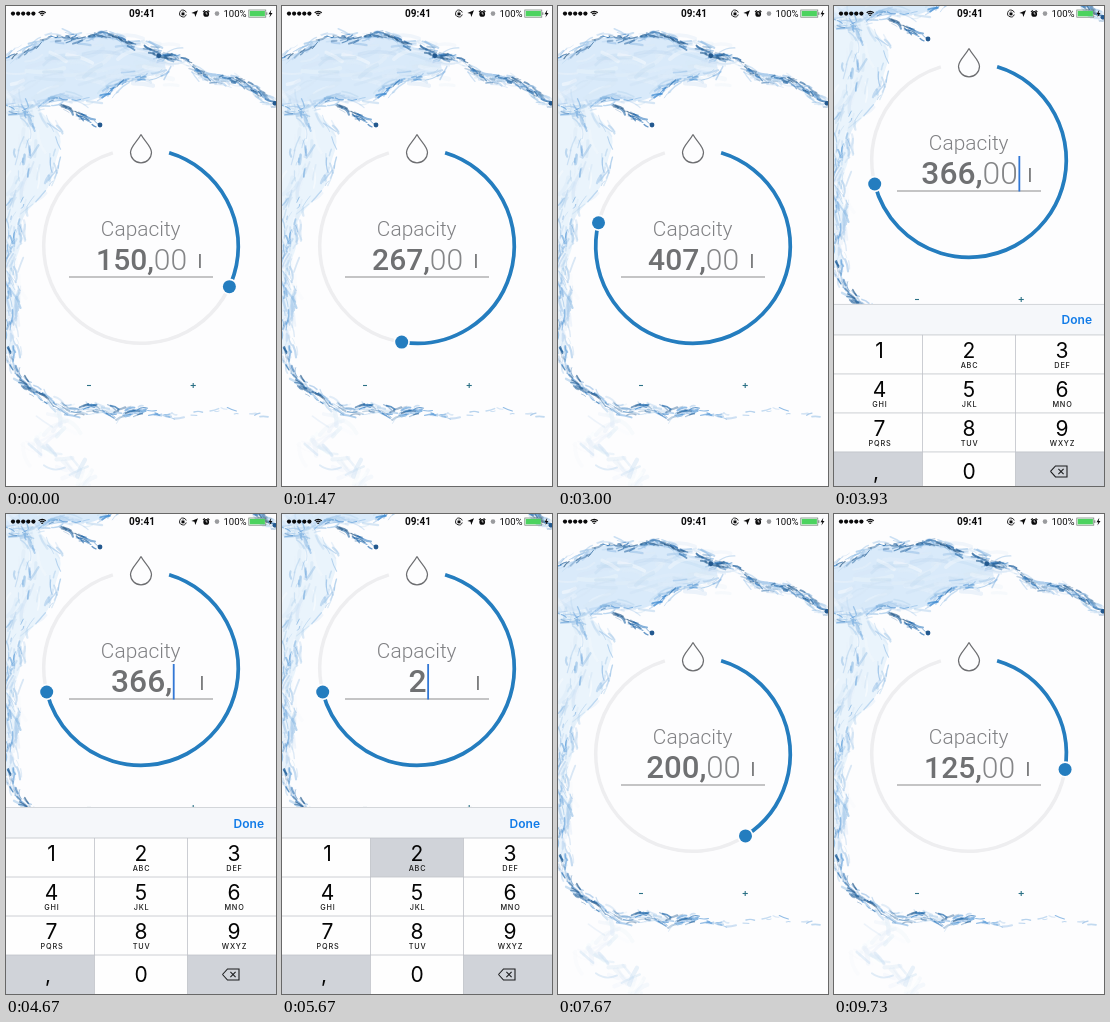
An HTML page with a canvas that plays this animation: 270 px wide and 480 px high, repeating every 9.99 s.

```html
<!DOCTYPE html>
<html lang="en">
<head>
<meta charset="utf-8">
<title>Capacity dial</title>
<style>
html, body { margin: 0; width: 100%; height: 100%; overflow: hidden; background: #fdfdfe; }
canvas { display: block; width: 270px; height: 480px; }
</style>
</head>
<body>
<canvas id="stage"></canvas>
<script>
const W = 270, H = 480, LOOP = 9990, SHIFT = 86, TAU = Math.PI * 2;
const PAPER = '#fdfdfe', BLUE = '#247dbf', BLACK = '#0b0b0c';
const ROBOTO = 'Roboto, sans-serif', INTER = 'Inter, sans-serif';
const SHOW = 3630, DONE = 6450;
const dpr = window.devicePixelRatio || 1;

function prepare(canvas) {
  canvas.width = W * dpr;
  canvas.height = H * dpr;
  const c = canvas.getContext('2d');
  c.scale(dpr, dpr);
  return c;
}
const ctx = prepare(document.getElementById('stage'));

const clamp = x => Math.max(0, Math.min(1, x));
const mix = (a, b, u) => a + (b - a) * u;
const ease = x => { x = clamp(x); return x * x * (3 - 2 * x); };
const spring = ms => { const w = Math.max(0, ms) * 0.0183; return 1 - (1 + w) * Math.exp(-w); };

// ---------- water backdrop ----------
let seed = 71;
const rand = () => (seed = (seed * 16807) % 2147483647) / 2147483647;
const spread = n => (rand() + rand() - 1) * n;

// Each curve maps u in 0..1 to a point
const along = (from, to, y) => u => { const x = mix(from, to, u); return [x, y(x)]; };
const crestTop = along(-5, 160, x => 30 + 22 * ((x - 80) / 80) ** 2 + 2.5 * Math.sin(x / 9));
const crestBottom = along(-5, 160, x => 102 - 42 * (x / 160) ** 2 + 4 * Math.sin(x / 11));
const crestBody = u => [crestTop(u)[0], mix(crestTop(u)[1], crestBottom(u)[1], 0.5)];
const arm = along(148, 269, x => 47 + (x - 150) * 0.39 + 4 * Math.sin(x / 10));
const spur = along(56, 94, x => 100 + (x - 56) * 0.5);
const columnEdge = u => {
  const y = mix(95, 350, u);
  return [8 + 46 * Math.exp(-(((y - 145) / 58) ** 2)) + 3 * Math.sin(y / 9), y];
};
const columnCore = u => { const [x, y] = columnEdge(u); return [x * 0.4, y]; };
const wave = along(-3, 135, x => 406 - 64 * Math.exp(-Math.max(0, x) / 24) + 2 * Math.sin(x / 8));
const ripple = along(120, 258, x => 407 + 2 * Math.sin(x / 12));
const fall = u => [mix(36, 62, u) + 18 * Math.sin(u * 9), mix(408, 472, u)];

function fillBetween(c, first, second, color) {
  c.fillStyle = color;
  c.beginPath();
  for (let u = 0; u <= 1; u += 0.02) c.lineTo(...first(u));
  for (let u = 1; u >= 0; u -= 0.02) c.lineTo(...second(u));
  c.fill();
}

// Short curved strokes scattered along a curve
function wisps(c, curve, { count, jitter, length, width, hue = 209, light, alpha }) {
  for (let k = 0; k < count; k++) {
    const u = rand(), [x0, y0] = curve(u), [x1, y1] = curve(u + 0.02);
    const x = x0 + spread(jitter), y = y0 + spread(jitter);
    const dir = Math.atan2(y1 - y0, x1 - x0) + spread(0.6), len = length * mix(0.15, 0.5, rand());
    const dx = Math.cos(dir) * len, dy = Math.sin(dir) * len, bend = spread(0.7);
    c.strokeStyle = `hsla(${hue}, 62%, ${light + spread(14)}%, ${alpha * mix(0.3, 1, rand())})`;
    c.lineWidth = width * mix(0.3, 1, rand());
    c.beginPath();
    c.moveTo(x - dx, y - dy);
    c.quadraticCurveTo(x - dy * bend, y + dx * bend, x + dx, y + dy);
    c.stroke();
  }
}

function paintWater() {
  const canvas = document.createElement('canvas'), c = prepare(canvas);
  c.fillStyle = PAPER;
  c.fillRect(0, 0, W, H);
  c.lineCap = 'round';
  c.filter = `blur(${0.6 * dpr}px)`;
  fillBetween(c, crestTop, crestBottom, '#d9eafa');
  fillBetween(c, columnEdge, u => [-5, columnEdge(u)[1]], '#eaf4fc');
  wisps(c, crestBody, { count: 70, jitter: 26, length: 38, width: 5, light: 91, alpha: 0.5 });
  wisps(c, columnCore, { count: 60, jitter: 16, length: 26, width: 4, light: 91, alpha: 0.5 });
  wisps(c, fall, { count: 45, jitter: 14, length: 24, width: 5, light: 94, alpha: 0.5 });

  const mist = { count: 70, jitter: 7, length: 17, width: 2.4, light: 76, alpha: 0.65 };
  for (const curve of [crestTop, crestBottom, arm, columnEdge, wave]) wisps(c, curve, mist);
  wisps(c, columnCore, { ...mist, count: 60, jitter: 16 });

  const deep = { count: 65, jitter: 4, length: 10, width: 2.1, light: 40, alpha: 0.75 };
  wisps(c, crestTop, deep);
  wisps(c, arm, { ...deep, count: 80, jitter: 5 });
  wisps(c, wave, { ...deep, count: 80, jitter: 6 });
  wisps(c, spur, { ...deep, count: 25 });
  wisps(c, crestBottom, { ...deep, count: 35, light: 52 });
  wisps(c, columnCore, { ...deep, count: 45, jitter: 14, light: 54, alpha: 0.6 });
  wisps(c, ripple, { ...deep, count: 32, light: 58, alpha: 0.6 });
  for (const tip of [spur(1), arm(0.04), arm(1)]) disc(...tip, 2.4, '#23598f', c);
  return canvas;
}

// ---------- timeline ----------
const KEYS = '<<<<<<200';
const keyTime = i => 4280 + i * 220;
const tapTime = i => 8620 + i * 490;
const TAPS = [0, 1, 2];

function dragValue(t) {
  const rise = ease(clamp((t - 530) / 1940) ** 1.19);
  return 150 + 305 * rise - 89 * ease((t - 2470) / 1010);
}

function dialValue(t) {
  if (t < DONE) return dragValue(t - 15);
  return TAPS.reduce((v, i) => v - 25 * ease((t - tapTime(i)) / 150), 366 - 166 * ease((t - DONE) / 300));
}

function shownText(t) {
  if (t < SHOW) return Math.round(dragValue(t)) + ',00';
  if (t >= DONE) return 200 - 25 * TAPS.filter(i => t >= tapTime(i)).length + ',00';
  return [...KEYS].filter((_, i) => t >= keyTime(i))
    .reduce((s, key) => key === '<' ? s.slice(0, -1) : s + key, '366,00');
}

// ---------- drawing ----------
function label(str, x, y, font, color, align = 'center', spacing = 0) {
  ctx.font = font;
  ctx.fillStyle = color;
  ctx.textAlign = align;
  ctx.letterSpacing = spacing + 'px';
  ctx.fillText(str, x, y);
  ctx.letterSpacing = '0px';
}

function line(color, width, ...pts) {
  ctx.strokeStyle = color;
  ctx.lineWidth = width;
  ctx.beginPath();
  pts.forEach(p => ctx.lineTo(...p));
  ctx.stroke();
}

function disc(x, y, r, color, c = ctx) {
  c.fillStyle = color;
  c.beginPath();
  c.arc(x, y, r, 0, TAU);
  c.fill();
}

function ring(x, y, r, from, to, color, width) {
  ctx.strokeStyle = color;
  ctx.lineWidth = width;
  ctx.beginPath();
  ctx.arc(x, y, r, from, to);
  ctx.stroke();
}

function box(x, y, w, h, color) {
  ctx.fillStyle = color;
  ctx.fillRect(x, y, w, h);
}

function polygon(color, ...pts) {
  ctx.fillStyle = color;
  ctx.beginPath();
  pts.forEach(p => ctx.lineTo(...p));
  ctx.fill();
}

function drawDial(t) {
  const rad = deg => (deg - 90) * Math.PI / 180;
  const gap = 16.8, r = 97.3, a = rad(gap + dialValue(t) * (360 - 2 * gap) / 500);
  ring(135, 240, r, rad(gap), rad(360 - gap), '#eeeef0', 3.5);
  ring(135, 240, r, rad(gap), a, BLUE, 3.7);
  const x = 135 + r * Math.cos(a), y = 240 + r * Math.sin(a);
  disc(x, y, 8.2, PAPER);
  disc(x, y, 6.5, BLUE);

  ctx.strokeStyle = '#6c6d70';
  ctx.lineWidth = 1.2;
  ctx.beginPath();
  ctx.moveTo(135, 128.5);
  ctx.bezierCurveTo(138, 134.5, 145.5, 140.5, 145.5, 146.3);
  ctx.arc(135, 146.3, 10.5, 0, Math.PI);
  ctx.bezierCurveTo(124.5, 140.5, 132, 134.5, 135, 128.5);
  ctx.stroke();
}

function drawValue(t) {
  const editing = t >= SHOW && t < DONE, edited = t >= DONE && t < tapTime(0);
  const size = editing ? 31.8 : edited ? 31.2 : 30;
  const [whole, strong, light] = [shownText(t), `500 ${size}px ${ROBOTO}`, `300 ${size}px ${ROBOTO}`];
  const cut = whole.includes(',') ? whole.indexOf(',') + 1 : whole.length;
  const head = whole.slice(0, cut), tail = whole.slice(cut);
  const measure = (str, font) => { ctx.font = font; return ctx.measureText(str).width; };
  const w1 = measure(head, strong), w2 = measure(tail, light), x = 135.6 - (w1 + w2) / 2;
  label(head, x, 264, strong, '#6f7072', 'left');
  label(tail, x + w1, 264, light, '#858688', 'left');
  label('l', editing ? 196 : edited ? 195 : 194, 262, `400 18px ${ROBOTO}`, '#6a6b6d');
  line('#8b8c8e', 1.1, [63, 271], [207, 271]);

  const lastKey = [...KEYS].reduce((m, _, i) => t >= keyTime(i) ? keyTime(i) : m, SHOW);
  if (editing && (t - lastKey) % 1000 < 600) box(x + w1 + w2 + 0.6, 236, 1.8, 35.5, '#3277d4');
}

function drawContent(t) {
  const up = ease((t - 3600) / 300) - ease((t - DONE) / 350), sign = '#2b7186';
  ctx.save();
  ctx.translate(0, -SHIFT * up);
  ctx.drawImage(water, 0, 0, W, H);
  drawDial(t);
  label('Capacity', 134.7, 229.7, `300 20.9px ${ROBOTO}`, '#808184');
  drawValue(t);
  line(sign, 1.1, [81, 379.5], [85, 379.5]);
  line(sign, 1.1, [184.6, 379.5], [189.8, 379.5]);
  line(sign, 1.1, [187.2, 376.9], [187.2, 382.1]);
  ctx.restore();
}

function drawBackspace(x, y) {
  const ink = '#1b1c1e';
  line(ink, 1.1, [x - 8.5, y], [x - 3.5, y - 5.5], [x + 8, y - 5.5], [x + 8, y + 5.5], [x - 3.5, y + 5.5], [x - 8.5, y]);
  for (const s of [-1, 1]) line(ink, 1.1, [x - 0.6, y - 2.6 * s], [x + 4.6, y + 2.6 * s]);
}

function drawKeyboard(t) {
  const shown = spring(t - SHOW) - spring(t - DONE);
  if (shown < 0.004) return;
  const letters = ' ABC DEF GHI JKL MNO PQRS TUV WXYZ'.split(' ');
  const pressed = [...KEYS].find((_, i) => t >= keyTime(i) && t < keyTime(i) + 120);
  const rule = '#bfc2c8';
  ctx.save();
  ctx.translate(0, 293 + 187 * (1 - shown));
  box(0, 0, W, 32, '#f5f7fa');
  line('#d3d6da', 1, [0, 0.5], [W, 0.5]);
  label('Done', 258, 20.5, `600 12px ${INTER}`, '#107be8', 'right');

  [...'123456789,0<'].forEach((key, i) => {
    const col = i % 3, row = Math.floor(i / 3), x = col * 93 - 4.5, y = 31 + row * 39;
    const cx = 42 + col * 93, grey = key === ',' || key === '<';
    box(x, y, 93, 40, grey !== (pressed === key) ? '#d0d3d9' : '#fefefe');
    if (key === '<') return drawBackspace(225, y + 19.5);
    const center = row < 3 && col === 0 ? 45.5 : cx;
    label(key, center, y + (row < 3 ? 23 : 27), `400 21px ${INTER}`, '#050505');
    if (row < 3) label(letters[i], center + 0.5, y + 33, `500 7.3px ${INTER}`, '#1a1a1a', 'center', 0.8);
  });
  for (let row = 0; row < 4; row++) line(rule, 0.8, [0, 31 + row * 39], [W, 31 + row * 39]);
  for (const x of [88.5, 181.5]) line(rule, 0.8, [x, 31], [x, 187]);
  ctx.restore();
}

function drawStatus() {
  for (let i = 0; i < 5; i++) disc(7 + i * 5.1, 7.6, 2.1, BLACK);
  for (let r = 1.2; r < 6; r += 1.9) ring(36.2, 10.3, r, -Math.PI * 0.75, -Math.PI * 0.25, BLACK, 1.2);
  label('09:41', 136, 11.2, `700 10px ${ROBOTO}`, BLACK);

  ring(177, 7.5, 3.4, 0.3, TAU - 0.3, BLACK, 0.9);
  box(175.5, 7, 3, 2.3, BLACK);
  ring(177, 7, 1.1, Math.PI, TAU, BLACK, 0.7);
  polygon(BLACK, [192, 4.3], [189.3, 11], [188.5, 7.7], [185.4, 7.1]);
  disc(200.2, 7.9, 2.9, BLACK);
  for (const s of [-1, 1]) line(BLACK, 1.1, [200.2 + s * 1.4, 4.3], [200.2 + s * 3.2, 5.8]);
  line('#ffffff', 0.7, [200.2, 6], [200.2, 8], [201.6, 8]);
  disc(211, 7.6, 2.3, '#9a9b9e');
  label('100%', 240.6, 11.1, `400 9.6px ${ROBOTO}`, BLACK, 'right');

  const shell = '#6d7a70';
  ctx.strokeStyle = shell;
  ctx.lineWidth = 0.7;
  ctx.strokeRect(242.8, 4, 17, 7.2);
  box(243.7, 4.9, 15.2, 5.4, '#4cd35f');
  box(260.3, 6.3, 1, 2.6, shell);
  polygon(BLACK, [265.3, 3.7], [262.5, 8.2], [264.3, 8.2], [263.4, 11.6], [266.5, 6.9], [264.7, 6.9]);
}

const water = paintWater();
const origin = performance.now();

function frame() {
  const t = (performance.now() - origin) % LOOP;
  box(0, 0, W, H, PAPER);
  drawContent(t);
  drawKeyboard(t);
  drawStatus();
  requestAnimationFrame(frame);
}
frame();
</script>
</body>
</html>
```
